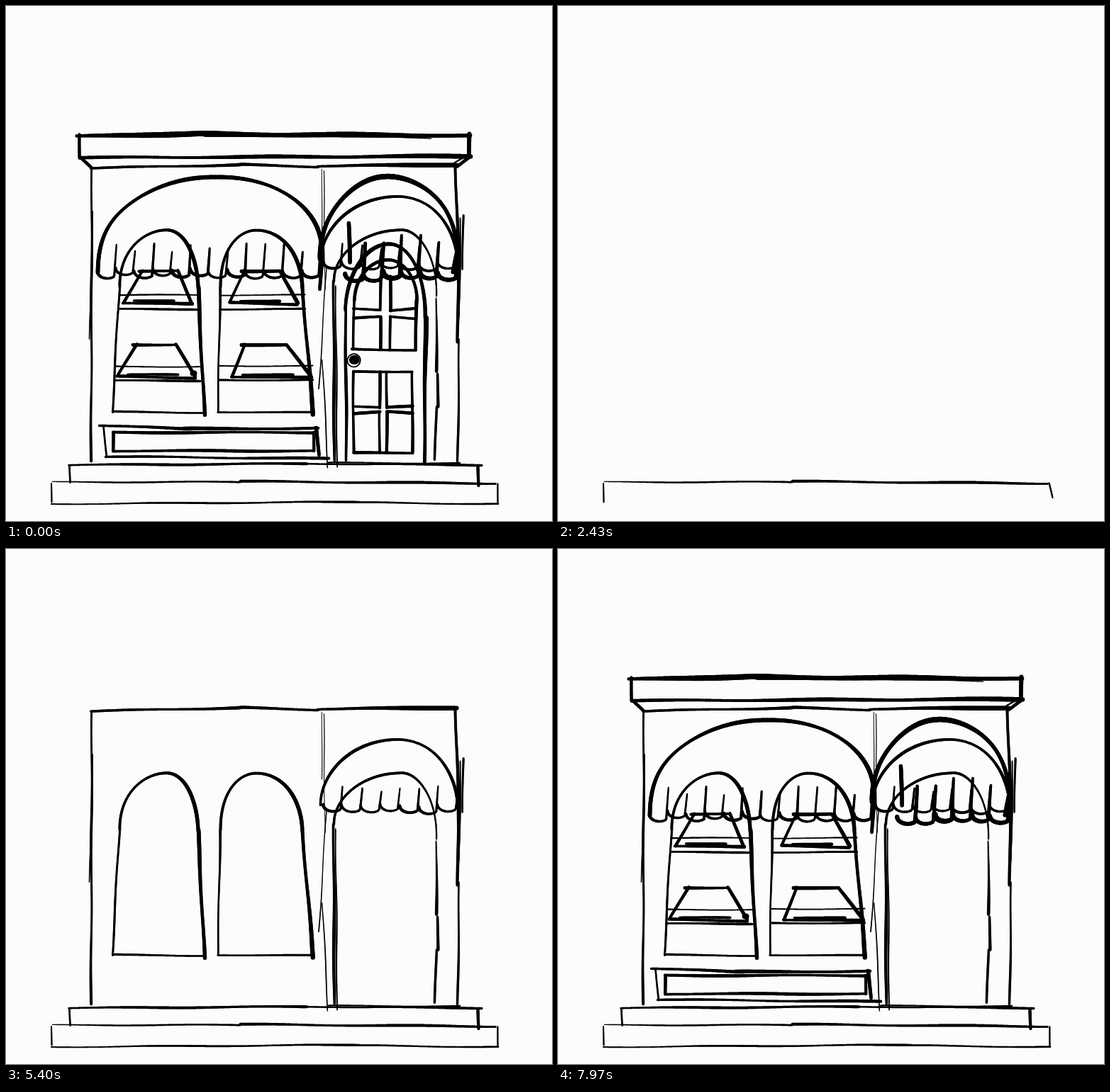
Animation, 770 px wide and 727 px high, one loop 8 s. Source, as an HTML page with a canvas:

```html
<!DOCTYPE html>
<html lang="en">
<head>
<meta charset="utf-8">
<title>Shop sketch</title>
<style>
  html, body { margin: 0; width: 100%; height: 100%; overflow: hidden; background: #fcfcfe; }
  canvas { display: block; }
</style>
</head>
<body>
<canvas id="stage" width="770" height="727"></canvas>
<script>
const W = 770, H = 727, LOOP = 8000, FADE = 1000, BLANK = 1300, SOFT = 800;
const ctx = document.getElementById('stage').getContext('2d');
const parts = [];

let seed = 7;
const random = () => (seed = seed * 16807 % 2147483647) / 2147483647;
const jitter = r => (random() * 2 - 1) * r;
const mix = (a, b, u) => a + (b - a) * u;

// Samples a path with a slightly unsteady hand; the width goes from w0 to w1.
function stroke(length, w0, w1, at) {
  const n = Math.max(1, Math.ceil(length / 3)), phase = random() * 6;
  const dots = [];
  for (let i = 0; i <= n; i++) {
    const u = i / n, s = u * length;
    const [x, y] = at(u);
    dots.push({
      x: x + .6 * Math.sin(s / 27 + phase),
      y: y + .6 * Math.sin(s / 33 + phase * 2),
      w: mix(w0, w1, u) * (1 + .15 * Math.sin(s / 40 + phase))
    });
  }
  return { dots };
}

const line = (x0, y0, x1, y1, w0 = 3, w1 = w0) =>
  stroke(Math.hypot(x1 - x0, y1 - y0), w0, w1, u => [mix(x0, x1, u), mix(y0, y1, u)]);

// Two quarter curves that meet at the peak; a larger n gives squarer shoulders.
function arch(x0, y0, px, py, x1, y1, w0 = 4, w1 = w0, n = 2) {
  return stroke(x1 - x0 + y0 + y1 - 2 * py, w0, w1, u => {
    const c = Math.abs(Math.cos(Math.PI * u)) ** (2 / n);
    const s = Math.sin(Math.PI * u) ** (2 / n);
    return u < .5 ? [mix(px, x0, c), mix(y0, py, s)] : [mix(px, x1, c), mix(y1, py, s)];
  });
}

const box = (x0, y0, x1, y1, w = 3) => [
  line(x0, y0, x0, y1, w), line(x0, y0, x1, y0, w),
  line(x1, y0, x1, y1, w), line(x0, y1, x1, y1, w)
];

// Hanging lobes, each round below and drawn out into a tall tip on its right.
function fringe(x0, x1, count, bottom, top, w) {
  const step = (x1 - x0) / count;
  return Array.from({ length: count }, (_, i) => {
    const x = x0 + i * step, low = bottom + jitter(3), tip = top + jitter(6);
    return stroke(step + low - tip, w, w * .6, u => {
      const a = Math.min(u * 2, 1) * Math.PI * .75, rise = Math.max(0, u * 2 - 1);
      return [
        x + step * (.5 - .55 * Math.cos(a)) + step * .11 * rise,
        mix(low - 10 + 10 * Math.sin(a), tip, rise)
      ];
    });
  });
}

const tray = (left, right, y, baseLeft, baseRight) => [
  line(left, y, right, y, 5, 4),
  line(left + 5, y, baseLeft, y + 45, 4), line(right, y, baseRight, y + 45, 4, 5),
  line(baseLeft, y + 45, baseRight, y + 47, 4, 5), line(baseLeft + 15, y + 42, baseRight - 25, y + 43, 3, 4)
];

const shelf = (x0, x1, y) => [line(x0, y, x1, y, 2), line(x0, y + 20, x1, y + 20, 3)];

const windowFrame = (x0, foot0, peak, x1, foot1) => [
  line(foot0, 573, x0, 397, 2.5, 3.5),
  arch(x0, 397, peak, 316, x1, 397, 3.5, 5),
  line(x1, 397, foot1, 577, 5, 5.5),
  line(foot0, 573, foot1, 574, 3)
];

// Glazing bars: four corners that leave a gap of 2g between them.
const bars = (x0, y0, x1, y1, cx, cy, g) =>
  [[x0, y0, -g, -g], [x1, y0, g, -g], [x0, y1, -g, g], [x1, y1, g, g]].map(([x, y, dx, dy]) => [
    line(x, cy + dy, cx + dx, cy + dy * .6, 4), line(cx + dx, cy + dy * .6, cx + dx, y, 4)
  ]);

// The strokes of a part follow one another between start and end.
function part(start, end, ...items) {
  const strokes = items.flat(Infinity);
  const size = strokes.reduce((sum, s) => sum + s.dots.length, 0);
  const p = { start, end, strokes, size, until: Infinity };
  parts.push(p);
  return p;
}

// Steps
part(2000, 2380, line(64, 674, 64, 700, 2), line(66, 672, 330, 672, 1.5, 3), line(330, 671, 690, 674, 3.5));
part(2385, 2425, line(692, 673, 697, 694, 2)).until = 2520;
part(2550, 2850, line(694, 674, 694, 703, 2.5), line(64, 703, 498, 700, 2, 3), line(498, 701, 694, 703, 2.5));
part(2850, 3150,
  line(90, 648, 91, 673, 3), line(89, 648, 425, 646, 3, 4), line(425, 646, 671, 648, 2.5, 3.5),
  line(666, 650, 667, 677, 5));

// Walls, roof line and divider
part(3150, 3500,
  line(121, 229, 120, 642, 3, 3.5), line(123, 290, 118, 470, 1.5),
  line(119, 229, 330, 224, 3, 4.5), line(330, 224, 440, 227, 4), line(440, 226, 636, 224, 4, 6),
  line(634, 226, 639, 400, 4.5, 4), line(638, 360, 637, 475, 4), line(639, 470, 637, 642, 3),
  line(645, 296, 644, 371, 3), line(641, 300, 639, 440, 2));
part(3500, 3620,
  line(446, 230, 445, 325, 1), line(448, 232, 450, 400, 1),
  line(452, 370, 441, 541, 1.5), line(446, 500, 454, 652, 1.5));

// Doorway and its small awning
part(3620, 3900,
  arch(463, 388, 560, 316, 607, 410, 4, 2.5),
  line(462, 388, 463, 642, 4), line(465, 395, 467, 650, 2),
  line(607, 413, 607, 515, 2, 4), line(609, 520, 609, 566, 4), line(607, 566, 605, 640, 3, 4),
  line(454, 645, 640, 645, 2));
part(3900, 4050, arch(444, 362, 550, 269, 637, 362, 4));
part(4050, 4300, fringe(448, 637, 7, 372, 340, 4));

// Guide line, soon removed
part(4330, 4470, line(163, 560, 407, 557, 4)).until = 4600;

// Windows with shelves and trays
part(4620, 5370, windowFrame(160, 150, 225, 271, 280), windowFrame(302, 299, 352, 418, 433));
part(5420, 5700, shelf(160, 272, 408), shelf(153, 274, 509), shelf(302, 421, 408), shelf(301, 432, 508));
part(5700, 6250,
  tray(188, 242, 374, 165, 262), tray(179, 239, 478, 157, 267), line(264, 519, 266, 519, 9),
  tray(332, 386, 374, 315, 411), tray(332, 395, 478, 318, 430));

// Heavy arches and fringes
part(6250, 6400, arch(443, 357, 540, 241, 637, 350, 7, 6), line(637, 345, 631, 375, 7));
part(6400, 6600, line(483, 306, 485, 362, 5), fringe(480, 637, 6, 386, 330, 7));
part(6600, 6790, arch(129, 376, 300, 242, 446, 355, 5, 5.5, 2.2), line(446, 350, 443, 400, 5));
part(6820, 7250, fringe(130, 444, 12, 382, 341, 4.5));

// Cornice and panel
part(7250, 7550,
  line(104, 181, 104, 215, 5), line(100, 184, 280, 180, 5, 8), line(280, 181, 655, 183, 8, 6),
  line(104, 214, 655, 212, 4, 6), line(653, 181, 653, 213, 5.5),
  line(105, 214, 120, 228, 5), line(655, 212, 637, 226, 5), line(651, 211, 632, 222, 2),
  line(545, 184, 600, 187, 1.5));
part(7550, 7880,
  line(132, 592, 250, 597, 4), line(250, 597, 440, 596, 5, 4), line(138, 592, 142, 636, 3),
  line(437, 596, 442, 634, 5), line(140, 636, 455, 639, 3, 4), box(151, 602, 434, 628, 4));

// Door leaf, only in the finished picture
part(LOOP, LOOP + 1,
  line(480, 642, 479, 430, 4), arch(479, 430, 540, 336, 592, 440, 5), line(592, 440, 590, 643, 6, 5),
  line(490, 484, 491, 415, 4), arch(491, 415, 540, 359, 579, 415, 4, 5), line(579, 415, 578, 485, 5),
  line(488, 484, 578, 486, 4), bars(490, 382, 579, 485, 535, 434, 7),
  box(490, 516, 573, 631, 4), bars(490, 516, 573, 631, 532, 570, 5),
  stroke(56, 2, 2, u => [491 + 9 * Math.cos(6.3 * u), 500 + 9 * Math.sin(6.3 * u)]),
  line(490, 500, 492, 500, 12));

function ink(dots, count) {
  for (let i = 1; i < count; i++) {
    const a = dots[i - 1], b = dots[i];
    ctx.lineWidth = (a.w + b.w) / 2;
    ctx.beginPath();
    ctx.moveTo(a.x, a.y);
    ctx.lineTo(b.x, b.y);
    ctx.stroke();
  }
}

function drawPart(p, share) {
  let left = Math.ceil(p.size * share);
  for (const { dots } of p.strokes) {
    if (left <= 0) return;
    ink(dots, Math.min(dots.length, left));
    left -= dots.length;
  }
}

// A soft veil sweeps in from the left.
function veil(t) {
  const front = (W + SOFT) * ((t - FADE) / (BLANK - FADE)) ** 2;
  const g = ctx.createLinearGradient(front - SOFT, 0, front, 0);
  g.addColorStop(0, 'rgba(252,252,254,1)');
  g.addColorStop(1, 'rgba(252,252,254,0)');
  ctx.fillStyle = g;
  ctx.fillRect(0, 0, W, H);
}

function frame() {
  const t = performance.now() % LOOP;
  const finished = t < BLANK;
  ctx.fillStyle = '#fcfcfe';
  ctx.fillRect(0, 0, W, H);
  ctx.strokeStyle = '#000';
  ctx.lineCap = 'round';
  for (const p of parts) {
    if (finished ? p.until < LOOP : t >= p.until) continue;
    const share = finished ? 1 : Math.min(1, (t - p.start) / (p.end - p.start));
    if (share > 0) drawPart(p, share);
  }
  if (finished && t > FADE) veil(t);
  requestAnimationFrame(frame);
}
frame();
</script>
</body>
</html>
```
